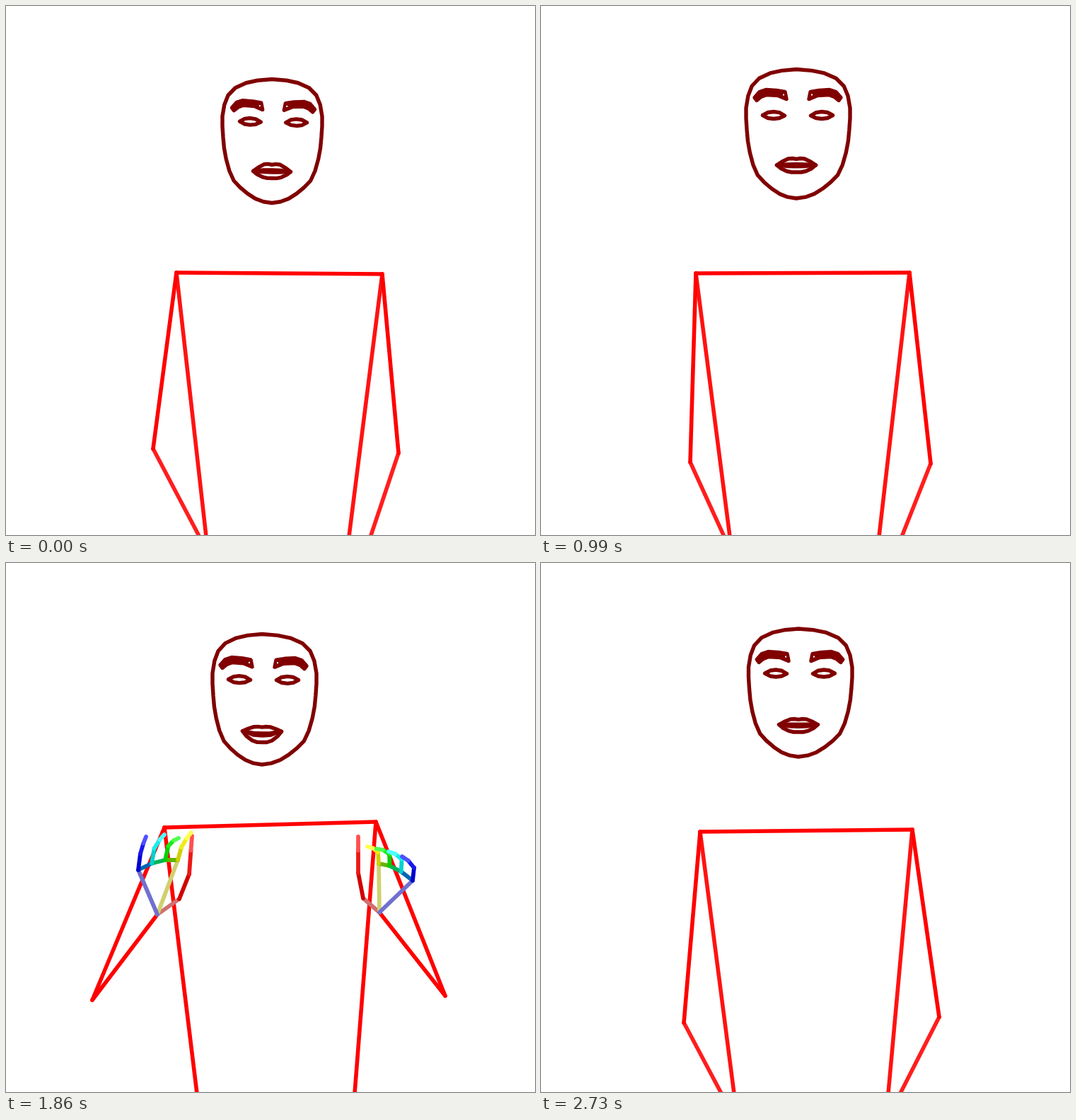
These frames come from a looping animation (748 by 748 pixels, 2.76 s). An HTML page with a canvas:

```html
<!DOCTYPE html>
<html lang="en">
<head>
<meta charset="utf-8">
<title>Signing skeleton</title>
<style>
  html, body { margin: 0; width: 100%; height: 100%; overflow: hidden; background: #fff; }
  canvas { display: block; width: 748px; height: 748px; }
</style>
</head>
<body>
<canvas id="stage" width="748" height="748"></canvas>
<script>
const ctx = document.getElementById('stage').getContext('2d');
const LOOP = 2760, STEP = 30;
ctx.lineCap = ctx.lineJoin = 'round';

// time, left, right, top, bottom, axis, brow, eye, lip top, mouth corner, lip bottom, tilt
const faceTrack = [
  [0, 306, 447, 103.5, 278.5, 376, 133.5, 164, 223.5, 234, 243.5, .02],
  [510, 293.5, 442, 94.5, 273, 365, 126, 157, 220.5, 229.5, 240, .03],
  [990, 290, 437, 89.5, 272, 361, 117.5, 154.5, 215.5, 225, 235, 0],
  [1080, 290, 437, 85.5, 269, 361, 114, 151, 212, 222, 233, 0],
  [1410, 296, 441, 90.5, 275, 363.5, 121, 155, 217.5, 227, 241, 0],
  [1860, 292, 439, 100.5, 285, 362, 133, 165, 231.5, 238, 253.5, .01],
  [2130, 292, 440, 104.5, 287, 362, 137, 168.5, 234.5, 241, 256, .02],
  [2730, 293.5, 440, 93, 274, 364, 124.5, 156, 220.5, 228.5, 239, 0]
];

// time, left shoulder, right shoulder, x of both torso lines at the lower edge
const torsoTrack = [
  [0, 241, 377, 532, 379, 283, 485],
  [510, 219, 377, 523, 380, 265, 480],
  [990, 219, 378, 521, 377, 267, 478],
  [1410, 229, 371, 523, 367, 271, 488],
  [1860, 224, 374, 523, 366, 270, 493],
  [2130, 225, 375, 524, 368, 277, 493],
  [2730, 225, 380, 525, 377, 273, 491]
];

// time, left, right
const elbowTrack = [
  [0, 208, 626, 555, 632],
  [240, 187, 638, 562, 642],
  [510, 208, 641, 548, 646],
  [990, 211, 645, 551, 647],
  [1080, 185, 642, 578, 640],
  [1290, 134, 632, 632, 617],
  [1410, 136, 631, 630, 616],
  [1860, 122, 618, 621, 612],
  [2130, 167, 630, 587, 623],
  [2730, 202, 650, 563, 642]
];
const wristTrack = [
  [0, 326, 850, 482, 850],
  [510, 300, 850, 470, 850],
  [990, 305, 851, 471, 849],
  [1200, 280, 580, 492, 570],
  [1410, 265, 472, 496, 462],
  [1860, 214, 497, 528, 494],
  [2130, 193, 582, 542, 572],
  [2340, 290, 840, 480, 840],
  [2730, 306, 846, 455, 854]
];

// time, thumb (base, bend, tip), index (base, bend), little finger (base, bend),
// tips from index to little finger; all measured from the wrist
const leftHand = [
  [1410, 33, -20, 52, -54, 71, -107, 36, -72, 51, -94, -17, -63, -9, -84,
    73, -116, 55, -109, 34, -110, 1, -110],
  [1860, 31, -22, 45, -57, 49, -111, 29, -77, 34, -95, -27, -63, -24, -86,
    48, -116, 30, -108, 10, -113, -16, -110],
  [2130, 28, -26, 37, -61, 34, -115, 12, -76, 9, -97, -42, -48, -49, -67,
    17, -79, -4, -83, -19, -83, -45, -85]
];
const rightHand = [
  [1410, -29, -27, -43, -60, -54, -113, -18, -79, -23, -98, 28, -56, 30, -75,
    -41, -104, -30, -103, -6, -111, 18, -99],
  [1860, -23, -20, -30, -56, -30, -107, -1, -69, -2, -85, 47, -45, 49, -63,
    -17, -93, -4, -90, 13, -86, 32, -79],
  [2130, -22, -20, -30, -52, -25, -96, 1, -72, 2, -85, 51, -33, 58, -45,
    1, -58, 19, -47, 35, -48, 47, -44]
];

// Half outlines, mirrored about the axis
const jaw = [[0, 0], [.29, .01], [.52, .03], [.74, .07], [.885, .13], [.96, .206], [1, .3], [1, .38],
  [.985, .47], [.965, .557], [.925, .645], [.86, .74], [.77, .82], [.64, .875], [.49, .925],
  [.335, .965], [.17, .99], [0, 1]];
const brow = [[61, 12], [54, 4], [45, 1], [30, 2], [18, 4], [16, 14], [28, 9], [44, 8], [52, 11], [58, 16]];
const eye = [[-15.5, 0], [-8, -4], [0, -5], [8, -3.8], [15.5, .5], [8, 4], [0, 5], [-8, 4]];
const upperLip = [[1, 0], [.74, .5], [.42, .95], [.2, 1], [0, .9]];
const lowerLip = [[1, 0], [.8, .45], [.5, .85], [.25, 1], [0, 1]];
const innerLip = [[.88, .1], [.45, .85], [0, 1]];

const mix = (a, b, k) => a + (b - a) * k;
const mixPoint = (a, b, k) => a.map((value, i) => mix(value, b[i], k));

function sample(track, time) {
  const next = track.findIndex(row => row[0] > time);
  if (next === 0) return track[0].slice(1);
  if (next < 0) return track[track.length - 1].slice(1);
  const a = track[next - 1], b = track[next];
  return mixPoint(a, b, (time - a[0]) / (b[0] - a[0])).slice(1);
}

const pairs = list => Array.from({ length: list.length / 2 }, (_, i) => [list[2 * i], list[2 * i + 1]]);

function trace(points, color, width, closed) {
  ctx.beginPath();
  points.forEach(p => ctx.lineTo(p[0], p[1]));
  if (closed) ctx.closePath();
  ctx.strokeStyle = color;
  ctx.lineWidth = width;
  ctx.stroke();
}

// Joins a half curve to its mirror image
const mirrored = (half, place) => [
  ...half.map(([u, v]) => place(-u, v)),
  ...half.slice().reverse().map(([u, v]) => place(u, v))
];

function drawFace(time) {
  const [left, right, top, bottom, axis, browY, eyeY, lipTop, corner, lipBottom, tilt] =
    sample(faceTrack, time);
  const color = '#800000', width = 5.4;
  const scale = (right - left) / 147, middle = axis + 2;
  const tilted = (x, y) => [x, y + tilt * (x - middle)];

  trace(mirrored(jaw, (u, v) =>
    [axis + u * (u < 0 ? axis - left : right - axis), mix(top, bottom, v)]), color, width, true);

  for (const side of [-1, 1]) {
    const at = (x, y) => tilted(middle + side * x * scale, y);
    trace(brow.map(([x, y]) => at(x, browY + y * scale)), color, width, true);
    ctx.fillStyle = color;
    ctx.fill();
    const [holeX, holeY] = at(20, browY + 8);
    ctx.fillStyle = '#fff';
    ctx.fillRect(holeX - 1, holeY - 1, 2, 2);
    trace(eye.map(([x, y]) => at(34 - x, eyeY + y * scale)), color, width, true);
  }

  const lip = (half, edge) => trace(mirrored(half, (u, v) =>
    tilted(axis + u * 27.5 * scale, mix(corner, edge, v))), color, width);
  const seam = (lipTop + lipBottom) / 2;
  lip(upperLip, lipTop);
  lip(lowerLip, lipBottom);
  lip(innerLip, seam - 1.5);
  lip(innerLip, seam + 1.5);
}

function drawBody(time, wrists) {
  const [leftShoulder, rightShoulder, hips] = pairs(sample(torsoTrack, time));
  const shoulders = [leftShoulder, rightShoulder];
  const elbows = pairs(sample(elbowTrack, time));
  // Lines pale while the wrists are out of view
  const fade = 30 * Math.min(1, Math.max(0, (wrists[0][1] - 600) / 240));
  const line = (a, b, pale) => {
    const level = Math.round(pale);
    trace([a, b], `rgb(255,${level},${level})`, 5.6);
  };
  shoulders.forEach((shoulder, i) => {
    line(shoulder, [hips[i], 750], fade * .6);
    line(elbows[i], wrists[i], fade);
    line(shoulder, elbows[i], 0);
  });
  line(leftShoulder, rightShoulder, 0);
}

// Channel mask per finger: thumb, index, middle, ring, little
const hues = [[1, 0, 0], [1, 1, 0], [0, 1, 0], [0, 1, 1], [0, 0, 1]];
const tones = [[208, 0], [236, 24], [255, 80]];
const tint = (hue, [on, off]) => `rgb(${hue.map(c => c ? on : off)})`;
const palmLinks = ['#66b300', '#00b35a', '#0066b3'];

function drawHand(track, time, wrist) {
  const [thumbBase, thumbBend, thumbTip, indexBase, indexBend, littleBase, littleBend, ...tips] =
    pairs(sample(track, time)).map(([x, y]) => [wrist[0] + x, wrist[1] + y]);
  const line = (a, b, color) => trace([a, b], color, 5.8);

  // Knuckles lie on a shallow arch between index and little finger
  const fingers = [0, .32, .66, 1].map((k, i) => {
    const arch = i % 3 ? 4.5 : 0;
    const [base, bend] = [[indexBase, littleBase], [indexBend, littleBend]].map(([a, b]) => {
      const [x, y] = mixPoint(a, b, k);
      return [x, y - arch];
    });
    const joint = mixPoint(bend, tips[i], .5).map((value, c) => value + .12 * (bend[c] - base[c]));
    return [base, bend, joint, tips[i]];
  });
  fingers.unshift([thumbBase, thumbBend, mixPoint(thumbBend, thumbTip, .62), thumbTip]);

  for (const i of [0, 1, 4]) line(wrist, fingers[i][0], tint(hues[i], [208, 112]));
  palmLinks.forEach((color, i) => line(fingers[i + 1][0], fingers[i + 2][0], color));
  fingers.forEach((chain, i) =>
    tones.forEach((tone, n) => line(chain[n], chain[n + 1], tint(hues[i], tone))));
}

function draw(time) {
  ctx.fillStyle = '#fff';
  ctx.fillRect(0, 0, 748, 748);
  const wrists = pairs(sample(wristTrack, time));
  drawBody(time, wrists);
  drawFace(time);
  if (time >= 1140 && time < 2280) {
    drawHand(leftHand, time, wrists[0]);
    drawHand(rightHand, time, wrists[1]);
  }
}

const start = performance.now();
function tick() {
  const elapsed = (performance.now() - start) % LOOP;
  draw(Math.floor(elapsed / STEP) * STEP);
  requestAnimationFrame(tick);
}
tick();
</script>
</body>
</html>
```
